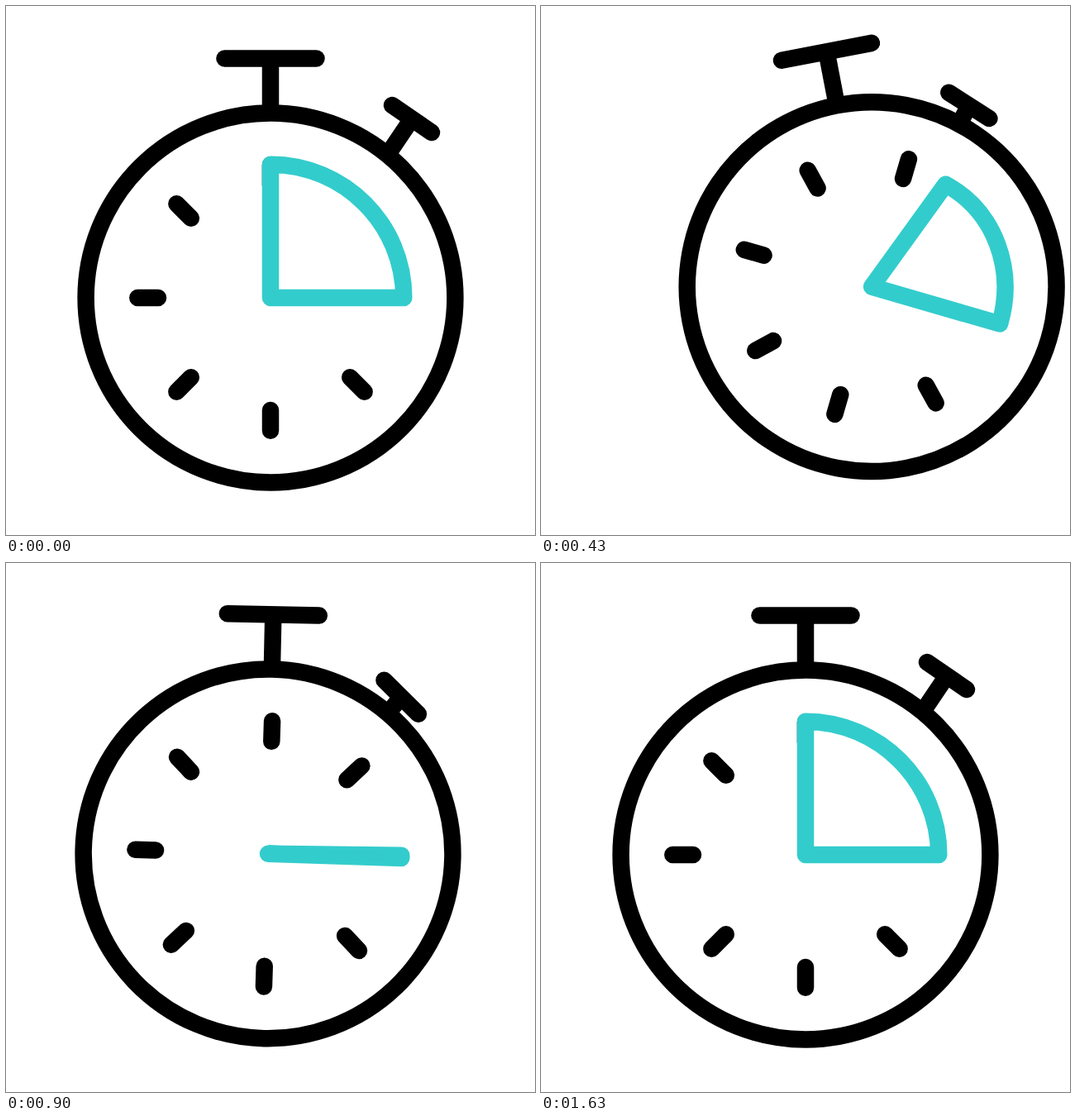
An HTML page that plays this animation: 640x640 px, repeating every 1670 ms.

```html
<!DOCTYPE html>
<html lang="en">
<head>
<meta charset="utf-8">
<title>Stopwatch</title>
<style>
  html, body { margin: 0; width: 100%; height: 100%; overflow: hidden; background: #fff; }
  svg { display: block; width: 100%; height: 100%; }
  .line { fill: none; stroke: #000; stroke-width: 20.5; stroke-linecap: round; }
  .stem { stroke-linecap: butt; }
  #wedge { fill: #fff; stroke: #33cccc; stroke-width: 20.5; stroke-linejoin: round; }
</style>
</head>
<body>
<svg viewBox="0 0 640 640">
  <g id="watch">
    <g id="body">
      <path class="line stem" d="M0-290V-223"/>
      <path class="line" d="M-55.5-289.5H55.5"/>
      <path class="line stem" id="buttonStem"/>
      <path class="line" id="buttonBar" d="M-29.1 0H29.1"/>
      <circle class="line" r="223.4"/>
    </g>
    <g id="dial">
      <path class="line" id="ticks"/>
      <path id="wedge"/>
    </g>
  </g>
</svg>
<script>
const LOOP = 1670, FRAME = 1000 / 30, LAST_FRAME = 49;
const RADIUS = 161.3;
const $ = id => document.getElementById(id);
const set = (id, name, value) => $(id).setAttribute(name, value);
const mix = (a, b, p) => a + (b - a) * p;
const ramp = (frame, start, end) => Math.min(1, Math.max(0, (frame - start) / (end - start)));
const smooth = p => p * p * (3 - 2 * p);
const radians = degrees => degrees * Math.PI / 180;

// The swing of the watch, as offsets from its resting pose.
const poses = [
  { at: 0, x: 0, y: 0, body: 0, dial: 0 },
  { at: 6.9, x: -75, y: 41.4, body: -36.4, dial: 0 },
  { at: 12.5, x: 82.5, y: -12.7, body: -11.2, dial: 16.2 },
  { at: 19.5, x: -78, y: -41, body: 10, dial: 14.7 },
  { at: 28, x: 0, y: 0, body: 0.9, dial: 1.3 },
  { at: 35, x: 0, y: 0, body: 0, dial: 0 }
];

function poseAt(frame) {
  const next = poses.findIndex(pose => pose.at > frame);
  if (next < 0) return poses[0];
  const from = poses[next - 1], to = poses[next];
  const p = smooth(ramp(frame, from.at, to.at));
  const part = key => mix(from[key], to[key], p);
  const bow = (to.x - from.x) * 0.13 * p * (1 - p);
  return { x: part("x"), y: part("y") + bow, body: part("body"), dial: part("dial") };
}

// Degrees the wedge covers: it closes a little faster and faster, then springs open.
function spanAt(frame) {
  const close = ramp(frame, 8, 27.2), open = ramp(frame, 37.5, 48);
  return 90 * (1 - close * (0.78 + 0.22 * close) + open ** 1.64);
}

// The arc stays on its circle; only the moving corner dips inwards on its way.
function wedgePath(span) {
  const a = radians(span), c = Math.cos(a), s = Math.sin(a), k = 4 / 3 * Math.tan(a / 4);
  const dip = 8.6 * Math.abs(Math.sin(Math.PI * Math.max(0, span - 15) / 37.5));
  const corner = [c, -s].map(v => v * (RADIUS - dip));
  const handles = [c + k * s, k * c - s, 1, -k].map(v => v * RADIUS);
  return `M0 0L${corner}C${handles} ${RADIUS} 0Z`;
}

function tickPath(degrees) {
  const outer = degrees === 45 ? 155.5 : 160.7;
  const point = r => [r * Math.sin(radians(degrees)), -r * Math.cos(radians(degrees))];
  return `M${point(outer)}L${point(outer - 24.7)}`;
}

function draw(time) {
  const frame = Math.min(LAST_FRAME, Math.floor((time % LOOP + 3.4) / FRAME));

  const pose = poseAt(frame);
  set("watch", "transform", `translate(${320 + pose.x} ${353 + pose.y})`);
  set("body", "transform", `rotate(${pose.body})`);
  set("dial", "transform", `rotate(${pose.dial})`);

  const press = smooth(ramp(frame, 0, 5)) - smooth(ramp(frame, 44, 49));
  const x = mix(171, 157, press), y = mix(-216.5, -193, press);
  set("buttonBar", "transform", `translate(${x} ${y}) rotate(${mix(34.5, 43.4, press)})`);
  set("buttonStem", "d", `M${x} ${y}L145-178`);

  set("wedge", "d", wedgePath(spanAt(frame)));
}

let ticks = "";
for (let degrees = 0; degrees < 360; degrees += 45) {
  if (degrees !== 90) ticks += tickPath(degrees);
}
set("ticks", "d", ticks);

const began = performance.now();
function play() {
  draw(performance.now() - began);
  requestAnimationFrame(play);
}
play();
</script>
</body>
</html>
```
